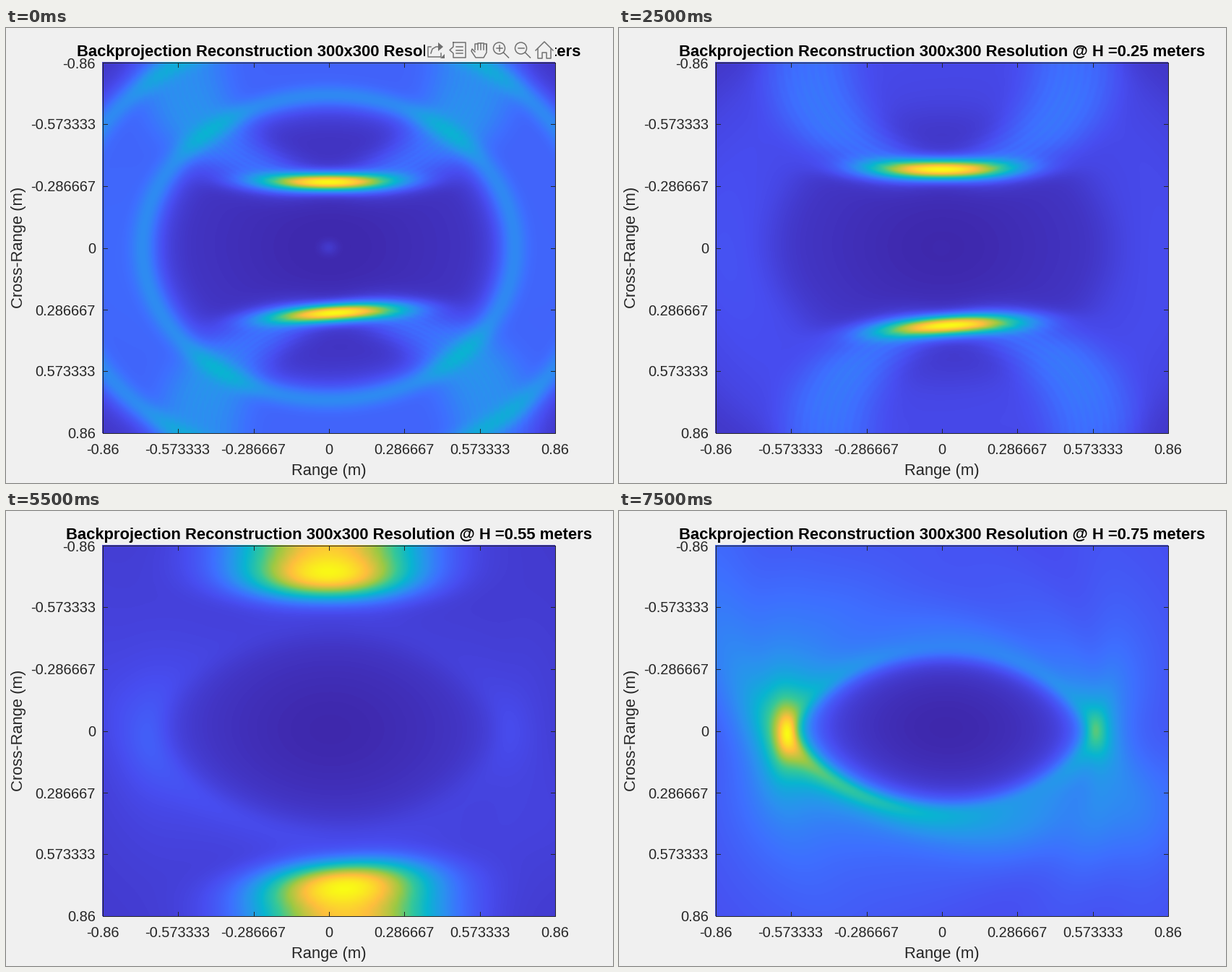
These frames come from a looping animation (840x630 px, 8 s). A matplotlib script:

```python
import numpy as np
import matplotlib.pyplot as plt
from matplotlib.animation import FuncAnimation
from matplotlib.colors import LinearSegmentedColormap
from matplotlib.patches import Circle, Polygon, Rectangle

W, H, DPI = 840, 630, 100
PT = 72 / DPI
STEPS, STEP_MS = 16, 500
L, R, T, B = 133.5, 759.5, 47.5, 560.5
SPAN = 0.86
INK, PAPER, GREY = "#262626", "#f0f0f0", "#6f6f6f"

plt.rcParams["font.family"] = "Liberation Sans"

parula = LinearSegmentedColormap.from_list("parula_like", [
    (0, "#3e26a8"), (.127, "#484df0"), (.222, "#3e6fff"), (.317, "#2b91ef"),
    (.444, "#08b5d0"), (.571, "#37c897"), (.698, "#9dc943"),
    (.841, "#febe3d"), (1, "#f9fb15")])

# Scene in metres
ORBIT = 0.87        # radius of the antenna path
PLATE = 0.565       # slant range of the two plates
LEAK = 0.165        # slant range of the antenna coupling
WALL = 1.44         # slant range of the far echoes

N = 200
axis = np.linspace(-SPAN, SPAN, N, dtype=np.float32)
X, Y = np.meshgrid(axis, axis)
RAD = np.hypot(X, Y)


def bell(v, width):
    return np.exp(-(v / width) ** 2)


def plate(h, tilt, side):
    """Bright plate and the fan of range circles around it."""
    c, s = np.cos(tilt), np.sin(tilt)
    along = X * c - Y * s
    out = side * (X * s + Y * c) - ORBIT
    slant = np.sqrt((along / 4) ** 2 + out ** 2 + h * h)
    core = bell(slant - PLATE, .04) * bell(along, .235 + .28 * h * h)

    shifts = np.linspace(-.13, .13, 7)
    fan = sum(bell(np.sqrt((along - d) ** 2 + out ** 2 + h * h) - PLATE, .085)
              for d in shifts) / len(shifts)
    ripple = 1 + .06 * np.sin(2 * np.pi * np.hypot(along, out)
                              / (.022 + .03 * h))
    gain = .26 * max(1 - (h / .62) ** 3, 0)
    return core + gain * fan * ripple * (1 - .75 * bell(along, .2))


def rings(h):
    """Coupling rings on both sides of the antenna path."""
    edge = np.abs(RAD - ORBIT)
    haze = .15 * bell(h * h, .06) * np.exp(-(edge / .25) ** 4)
    return haze + .14 * bell(np.hypot(edge, h) - LEAK, .05)


def walls(h):
    """Backproject the far echoes from every antenna angle, scaled to 0..1."""
    rng = np.random.default_rng(4)
    angles = np.linspace(-np.pi, np.pi, 180, endpoint=False)
    turn = np.angle(np.exp(1j * (angles - np.radians(-66))))
    power = 1 + .25 * np.cos(angles) + 1.5 * bell(turn, np.radians(18))
    for k in range(3, 10):
        power += .07 * np.cos(k * angles + rng.uniform(0, 2 * np.pi))

    width = .04 + .2 * max(.75 - h, 0)
    total = np.zeros_like(X)
    for a, p in zip(angles, power):
        cx, cy = ORBIT * np.cos(a), ORBIT * np.sin(a)
        slant = np.sqrt((X - cx) ** 2 + (Y - cy) ** 2 + h * h)
        total += p / (1 + ((slant - WALL - .2 * np.cos(a) ** 2) / width) ** 2)
    return (total - total.min()) / np.ptp(total)


def field(h):
    v = .15 * (.2 + .8 * (h / .55) ** 2) * walls(h) + rings(h)
    v = v + plate(h, 0, -1) + plate(h, .08, 1)
    v += .06 * bell(h, .15) * bell(RAD, .035)
    v /= v.max()
    floor = .045 - .035 * np.exp(-(X / .4) ** 2 - (Y / .35) ** 2)
    return floor + (1 - floor) * v


fig = plt.figure(figsize=(W / DPI, H / DPI), dpi=DPI, facecolor=PAPER)
ax = fig.add_axes([0, 0, 1, 1])
levels = [k * 0.05 for k in range(STEPS)]
fields = [field(h) for h in levels]
image = ax.imshow(fields[0], cmap=parula, vmin=0, vmax=1, aspect="auto",
                  extent=(L - .5, R + .5, B + .5, T - .5),
                  interpolation="bilinear")
ax.set_xlim(0, W)
ax.set_ylim(H, 0)
ax.axis("off")


def text(x, y, s, px, ha="center", **kw):
    kw.setdefault("color", INK)
    return ax.text(x, y, s, fontsize=px * PT, ha=ha, va="baseline", **kw)


def line(xs, ys, width=1, color=INK, **kw):
    return ax.plot(xs, ys, color=color, lw=width * PT, **kw)[0]


line([L, R, R, L, L], [T, T, B, B, T], solid_joinstyle="miter")
for i in range(7):
    x = round(L + (R - L) * i / 6 - .5) + .5
    y = round(T + (B - T) * i / 6 - .5) + .5
    for end, step in ((T, 6), (B, -6)):
        line([x, x], [end, end + step])
    for end, step in ((L, 6), (R, -6)):
        line([end, end + step], [y, y])
    label = f"{SPAN * (i - 3) / 3:g}"
    text(x, 590, label, 20)
    text(124, y + 8, label, 20, ha="right")

text(447, 619.5, "Range (m)", 22)
text(23, 304, "Cross-Range (m)", 22, rotation=90, rotation_mode="anchor")
title = text(447, 39, "", 22, color="black", weight="bold")

# Hover toolbar
toolbar = [ax.add_patch(Rectangle((580, 18), 180, 28.5, fc=PAPER, ec="none",
                                  zorder=5))]


def stroke(*pts, width=1.5):
    toolbar.append(line(*zip(*pts), width, GREY, zorder=6))


def fill(*pts):
    toolbar.append(ax.add_patch(Polygon(pts, fc=GREY, ec="none", zorder=6)))


# Export
stroke((588, 26), (584, 26), (584, 40), (602, 40), (602, 35))
stroke((588, 35), (590, 29), (595, 26), (599, 26))
fill((598, 20), (605, 26), (598, 32))
fill((607, 36), (607, 42), (601, 42))

# Data tip
stroke((619, 20), (636, 20), (636, 41), (619, 41), (619, 35),
       (614, 30.5), (619, 26), (619, 20))
for y in (26, 30.5, 35):
    stroke((623, y), (632, y))

# Pan hand
for i in range(5):
    x, top = 649 + 4 * i, 20 + abs(i - 1.5)
    stroke((x, 30), (x, top), (min(x + 4, 665), top))
stroke((649, 33), (645, 29), (644, 32), (650, 41), (661, 41), (665, 34),
       (665, 23))

# Zoom in and out
for cx, plus in ((682.5, True), (712.5, False)):
    toolbar.append(ax.add_patch(Circle((cx, 28), 8, fc="none", ec=GREY,
                                       lw=1.5 * PT, zorder=6)))
    stroke((cx - 4, 28), (cx + 4, 28))
    if plus:
        stroke((cx, 24), (cx, 32))
    stroke((cx + 6, 34), (cx + 13, 41))

# Home
stroke((733, 31), (745, 19), (757, 31))
stroke((736, 29), (736, 42), (742, 42), (742, 34), (748, 34), (748, 42),
       (754, 42), (754, 29))


def draw(k):
    image.set_data(fields[k])
    title.set_text("Backprojection Reconstruction 300x300 Resolution "
                   f"@ H ={levels[k]:g} meters")
    for part in toolbar:
        part.set_visible(k == 0)
    return [image, title, *toolbar]


anim = FuncAnimation(fig, draw, frames=STEPS, interval=STEP_MS, repeat=True,
                     repeat_delay=0, blit=False)
plt.show()
```
